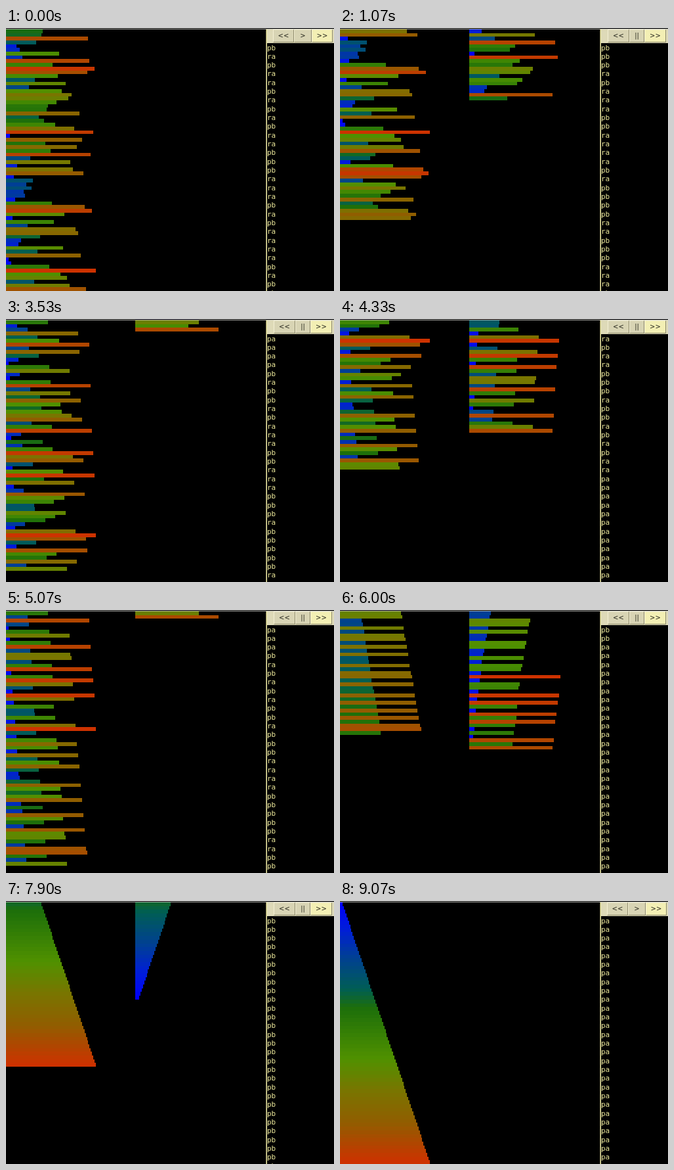
Recreate the animation shown at these times as an HTML page with a canvas. Size 500 px wide and 400 px high, loop 9.31 s.

```html
<!DOCTYPE html>
<html lang="en">
<head>
<meta charset="utf-8">
<title>Two-stack radix sort</title>
<style>
  html, body { margin: 0; width: 100%; height: 100%; overflow: hidden; background: #000; }
  #stage { position: relative; width: 500px; height: 400px; overflow: hidden; background: #000; }
  #stage > * { position: absolute; }
  canvas { left: 0; top: 0; }
  #rule { left: 0; top: 1px; width: 500px; height: 1px; background: #b9b9b4; }
  #split { left: 396px; top: 2px; width: 2px; height: 398px; background: linear-gradient(90deg, #8e8a62 50%, #ece8a4 50%); }
  #bar { left: 398px; top: 2px; width: 102px; height: 21px; background: #dedab8; }
  #bar span {
    position: absolute; top: 0; height: 20px; box-sizing: border-box;
    border: 1px solid; border-color: #f4f1d4 #8f8b6c #8f8b6c #f4f1d4;
    background: #d8d4b4; color: #26261c;
    font: 10px/18px "DejaVu Sans", sans-serif; text-align: center;
  }
  #back { left: 9px; width: 32px; }
  #play { left: 41px; width: 27px; }
  #bar #fwd { left: 68px; width: 32px; background: #f3efb4; }
  .on #back { left: 10px; width: 33px; }
  .on #play { left: 43px; width: 23px; }
  .on #bar #fwd { left: 66px; width: 33px; }
  #list {
    left: 398px; top: 23.5px; margin: 0; color: #eeea9c;
    font: 11px/13.333px "DejaVu Sans Mono", monospace;
  }
</style>
</head>
<body>
<div id="stage">
  <canvas id="view" width="396" height="400"></canvas>
  <div id="rule"></div>
  <div id="split"></div>
  <div id="bar"><span id="back">&lt;&lt;</span><span id="play">&gt;</span><span id="fwd">&gt;&gt;</span></div>
  <pre id="list"></pre>
</div>
<script>
const LOOP = 9310, TICK = 100 / 3, PLAY = 600, STOP = 9030, LINES = 28;
const start = [
  28, 27, 64, 23, 7, 10, 41, 12, 65, 36, 69, 63, 40, 22, 46, 17, 43, 51, 48, 39,
  32, 31, 57, 25, 29, 38, 53, 68, 2, 59, 30, 55, 34, 66, 18, 50, 8, 52, 60, 5,
  20, 15, 19, 13, 14, 6, 35, 61, 67, 45, 4, 37, 16, 54, 56, 26, 11, 9, 44, 24,
  58, 1, 3, 33, 70, 42, 47, 21, 49, 62
];
const size = start.length;

// Radix sort, one bit per pass, keeping every state.
const ops = [], states = [];
const a = [...start], b = [];
const save = () => states.push([[...a], [...b]]);
const moves = {
  pa: () => a.unshift(b.shift()),
  pb: () => b.unshift(a.shift()),
  ra: () => a.push(a.shift())
};
const run = op => { moves[op](); ops.push(op); save(); };
save();
for (let bit = 0; bit < 7; bit++) {
  for (let i = 0; i < size; i++) run(a[0] >> bit & 1 ? 'ra' : 'pb');
  while (b.length) run('pa');
}

// Pace of the run: [tick, operations done, operations per tick]
const pace = [
  [23, 1, 4], [32, 37, 4.07], [74, 211, 3.65], [106, 312, 2.75],
  [152, 421, 2.45], [208, 573, 3.15], [263, 772, 4]
];
function done(tick) {
  if (tick < 18) return 0;
  if (tick <= pace[0][0]) return 1;
  const i = pace.findIndex(p => p[0] >= tick);
  if (i < 0) return ops.length;
  const [t0, n0, s0] = pace[i - 1], [t1, n1, s1] = pace[i];
  const d = t1 - t0, u = (tick - t0) / d, v = 1 - u;
  return Math.round(v * v * ((1 + 2 * u) * n0 + u * d * s0) + u * u * ((3 - 2 * u) * n1 - v * d * s1));
}

const stops = [
  [0, 0, 0, 250], [.1, 0, 30, 215], [.2, 0, 62, 150], [.33, 0, 94, 84], [.4, 28, 110, 10],
  [.6, 80, 145, 0], [.72, 120, 118, 0], [.85, 146, 92, 0], [1, 205, 50, 0]
];
function color(rank) {
  const x = (rank - 1) / (size - 1);
  const i = Math.max(1, stops.findIndex(s => s[0] >= x));
  const p = stops[i - 1], q = stops[i], u = (x - p[0]) / (q[0] - p[0]);
  return `rgb(${[1, 2, 3].map(c => Math.round(p[c] + (q[c] - p[c]) * u))})`;
}
const colors = start.map((_, i) => color(i + 1));

const $ = id => document.getElementById(id);
const ctx = $('view').getContext('2d');
const rowY = i => Math.round(2 + i * 398 / size);

function drawStack(stack, left, base) {
  stack.forEach((rank, i) => {
    ctx.fillStyle = colors[rank - 1];
    const width = Math.round(base + (rank - 1) * 133 / (size - 1));
    ctx.fillRect(left, rowY(i), width, rowY(i + 1) - rowY(i));
  });
}

let shown = -1;
function frame(now) {
  const t = now % LOOP;
  const on = t >= PLAY && t < STOP;
  $('stage').className = on ? 'on' : '';
  $('play').textContent = on ? '||' : '>';
  const n = done(Math.floor((t + 3.5) / TICK));
  if (n !== shown) {
    shown = n;
    ctx.clearRect(0, 0, 396, 400);
    drawStack(states[n][0], 0, 4);
    drawStack(states[n][1], 197, 6);
    const top = Math.min(Math.max(0, n - 1), ops.length - LINES);
    $('list').textContent = ops.slice(top, top + LINES + 1).join('\n');
  }
}

const origin = performance.now();
function loop() {
  frame(performance.now() - origin);
  requestAnimationFrame(loop);
}
loop();
</script>
</body>
</html>
```
